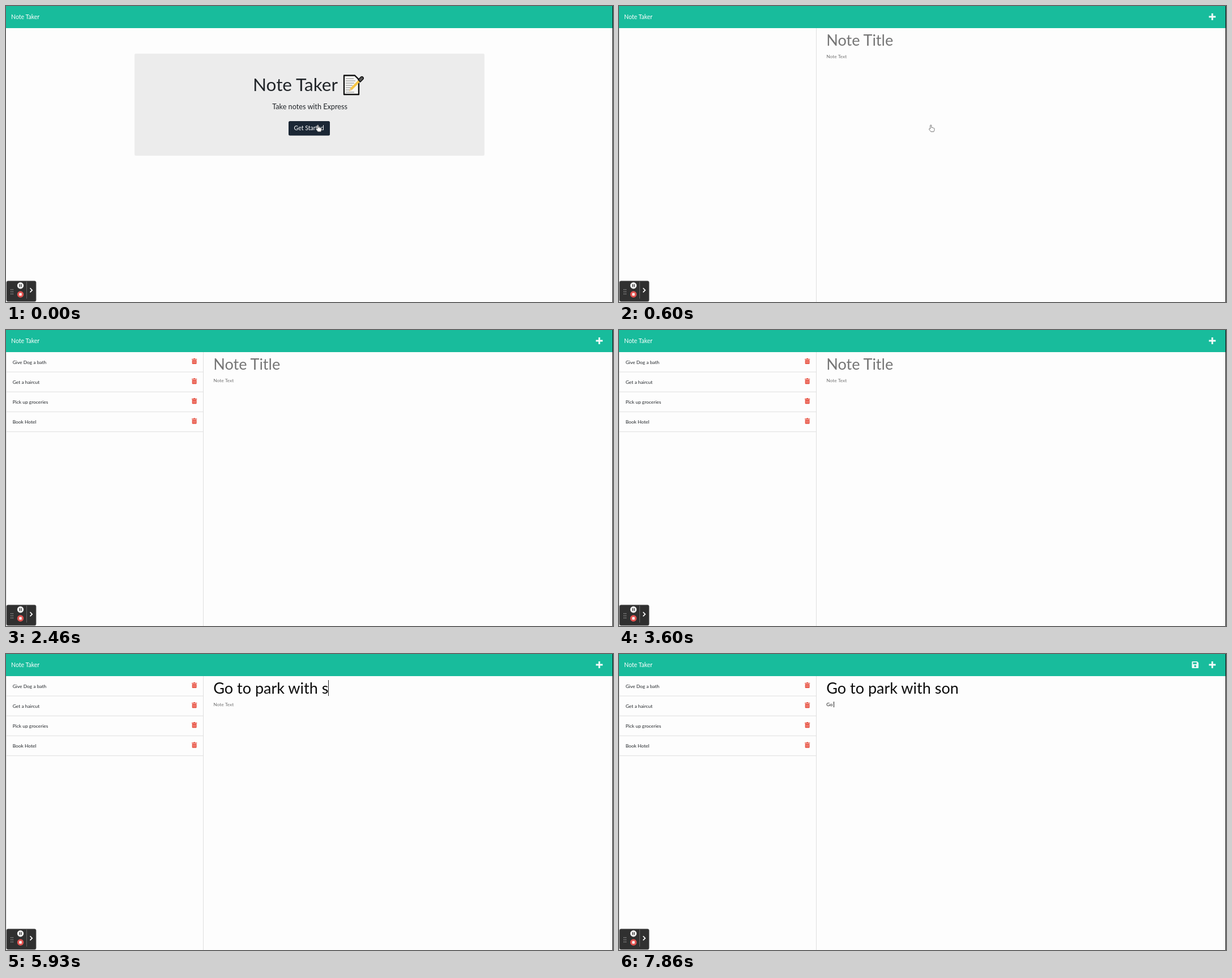
Recreate the animation shown at these times as an HTML page. Size 1072x522 px, loop 8 s.

```html
<!DOCTYPE html>
<html lang="en">
<head>
<meta charset="utf-8">
<title>Note Taker</title>
<style>
html, body { margin: 0; height: 100%; overflow: hidden; background: #fdfdfd; }
svg { display: block; width: 100%; height: 100%; }
text { font: 8.44px Lato, sans-serif; fill: #212529; white-space: pre; }
.brand, .button { font-size: 10.55px; fill: #fff; }
.head { font-size: 31.5px; }
.lead { font-size: 12.66px; }
#title { font-size: 27px; }
.line { stroke: #dfdfdf; }
</style>
</head>
<body>
<svg viewBox="0 0 1072 522">
  <defs>
    <g id="trash" fill="#e74c3c">
      <path d="M0 1.2h3l.6-1h2l.6 1h3v1.3H0z"/>
      <path d="M.7 3.2h7.8v6.2q0 1-1 1h-5.8q-1 0-1-1z"/>
      <path d="M2.7 4.6v4.4M4.6 4.6v4.4M6.5 4.6v4.4" stroke="#f6c3bd" stroke-width=".7"/>
    </g>
  </defs>
  <rect width="1072" height="522" fill="#fdfdfd"/>

  <g id="home">
    <rect x="227" y="84" width="618" height="180" rx="2" fill="#ececec"/>
    <text class="head" x="436" y="150">Note Taker</text>
    <g stroke-linejoin="round">
      <path d="M597 122.5h19l7 7v26.500h-26z" fill="#f7f7f4" stroke="#111" stroke-width="2.4"/>
      <path d="M600 128h14M600 132h17M600 136h15M600 140h12M600 144h10M600 148h9M600 152h15" stroke="#aaa" stroke-width="1.3"/>
      <path d="M606 150l2-5 17-17 3 3-17 17z" fill="#f7c545"/>
      <path d="M606 150l2-5 3 3z" fill="#e6c9a0"/>
      <path d="M622 130l5-5q2-1 3.500.5t.2 3.500l-5 5z" fill="#555" stroke="#111" stroke-width="1.5"/>
    </g>
    <text class="lead" x="470.300" y="182">Take notes with Express</text>
    <rect x="499" y="203" width="73" height="25.500" rx="2.500" fill="#1b2735"/>
    <text class="button" x="508.500" y="219.300">Get Started</text>
  </g>

  <g id="notes">
    <path class="line" d="M.5 39v483M348.500 39v483"/>
    <g id="list"></g>
    <text id="title" x="366.300" y="70"></text>
    <text id="body" x="366.300" y="92"></text>
    <rect id="caret" width="1" fill="#222"/>
  </g>

  <rect width="1071" height="39" fill="#18bc9c"/>
  <text class="brand" x="9" y="23.300">Note Taker</text>
  <path id="plus" d="M1047.800 13v12M1041.800 19h12" stroke="#f2fbf9" stroke-width="2.900"/>
  <path id="save" fill="#e8f8f5" fill-rule="evenodd" d="M1013 13h8l2.500 2.500v8.500q0 1-1 1h-9.500q-1.300 0-1.300-1.200v-9.500q0-1.300 1.300-1.300zM1013.700 14.700v3h6.500v-3zM1017.600 19.600a1.800 1.800 0 1 0 .01 0z"/>

  <path id="hand" transform="translate(546.500 209)" d="M3.200 7.500V2q0-1.200 1.100-1.200T5.400 2v3.400q1.300-.5 1.900.4 1.300-.4 1.700.5 1.600-.2 1.600 1.400 0 3-1.300 5H4.400Q3 10.800 1.200 8.700q-.4-1.200.6-1.500.8 0 1.400.9z" fill="#fff" stroke="#666" stroke-width=".9"/>

  <rect x="1" y="485" width="52" height="36" rx="2.500" fill="#303030" stroke="#555" stroke-width=".8"/>
  <path d="M9 499.500v9M12 499.500v9" stroke="#aaa" stroke-width="1.400" stroke-dasharray="1.400 2.400"/>
  <path d="M36.500 486v30" stroke="#666"/>
  <circle cx="25.500" cy="493" r="5.700" fill="#f3f3f3"/>
  <path d="M24.200 490.500v5M27 490.500v5" stroke="#333" stroke-width="1.400"/>
  <circle cx="25.500" cy="508.500" r="5.700" fill="#e0524f"/>
  <rect x="23.300" y="506.300" width="4.400" height="4.400" rx=".5" fill="#fff"/>
  <path d="M42.500 497.500l3.700 3.700-3.700 3.700" fill="none" stroke="#fff" stroke-width="1.700"/>
  <rect x="1071" width="1" height="522" fill="#111"/>
</svg>
<script>
const $ = id => document.getElementById(id);
const show = (id, on) => $(id).style.display = on ? "" : "none";
const between = (t, a, b) => t >= a && t < b;

$("list").innerHTML = ["Give Dog a bath", "Get a haircut", "Pick up groceries", "Book Hotel"].map((name, i) =>
  `<g transform="translate(0 ${i * 35.1})"><text x="11.700" y="59.800">${name}</text>
  <use href="#trash" x="328" y="49.700"/><path class="line" d="M0 74h348"/></g>`).join("");

// Each entry is [time, number of letters typed so far].
const titleKeys = [[3930, 1], [4060, 2], [4260, 3], [4400, 4], [4530, 5], [4730, 6], [4800, 8], [5000, 9],
  [5060, 10], [5200, 11], [5260, 12], [5400, 13], [5530, 14], [5600, 15], [5800, 16], [5930, 17], [6000, 18], [6060, 19]];
const bodyKeys = [[7530, 1], [7730, 2], [7860, 3]];

function typed(text, keys, t) {
  const last = keys.filter(k => k[0] <= t).pop();
  return last ? text.slice(0, last[1]) : "";
}

function field(id, value, placeholder) {
  const el = $(id), text = value || placeholder;
  if (el.textContent !== text) el.textContent = text;
  el.style.fill = value ? "#0b0b0b" : "#757575";
}

function draw(t) {
  const home = t < 600;
  show("home", home);
  show("notes", !home);
  show("plus", !home);
  show("list", t >= 660);
  show("hand", t < 660);
  show("save", t >= 7600);

  const title = typed("Go to park with son", titleKeys, t);
  const body = typed("Go to the", bodyKeys, t);
  field("title", title, "Note Title");
  field("body", body, "Note Text");

  const inBody = t >= 6800;
  const value = inBody ? body : title;
  const width = value ? $(inBody ? "body" : "title").getComputedTextLength() : 0;
  const caret = $("caret");
  caret.setAttribute("x", Math.round(366.3 + width));
  caret.setAttribute("y", inBody ? 84 : 46);
  caret.setAttribute("height", inBody ? 10 : 28);
  show("caret", between(t, 1930, 2460) || between(t, 3000, 3460) || between(t, 3930, 6460) || inBody);
}

const start = performance.now();
function tick() {
  draw((performance.now() - start) % 8000);
  requestAnimationFrame(tick);
}
tick();
</script>
</body>
</html>
```
